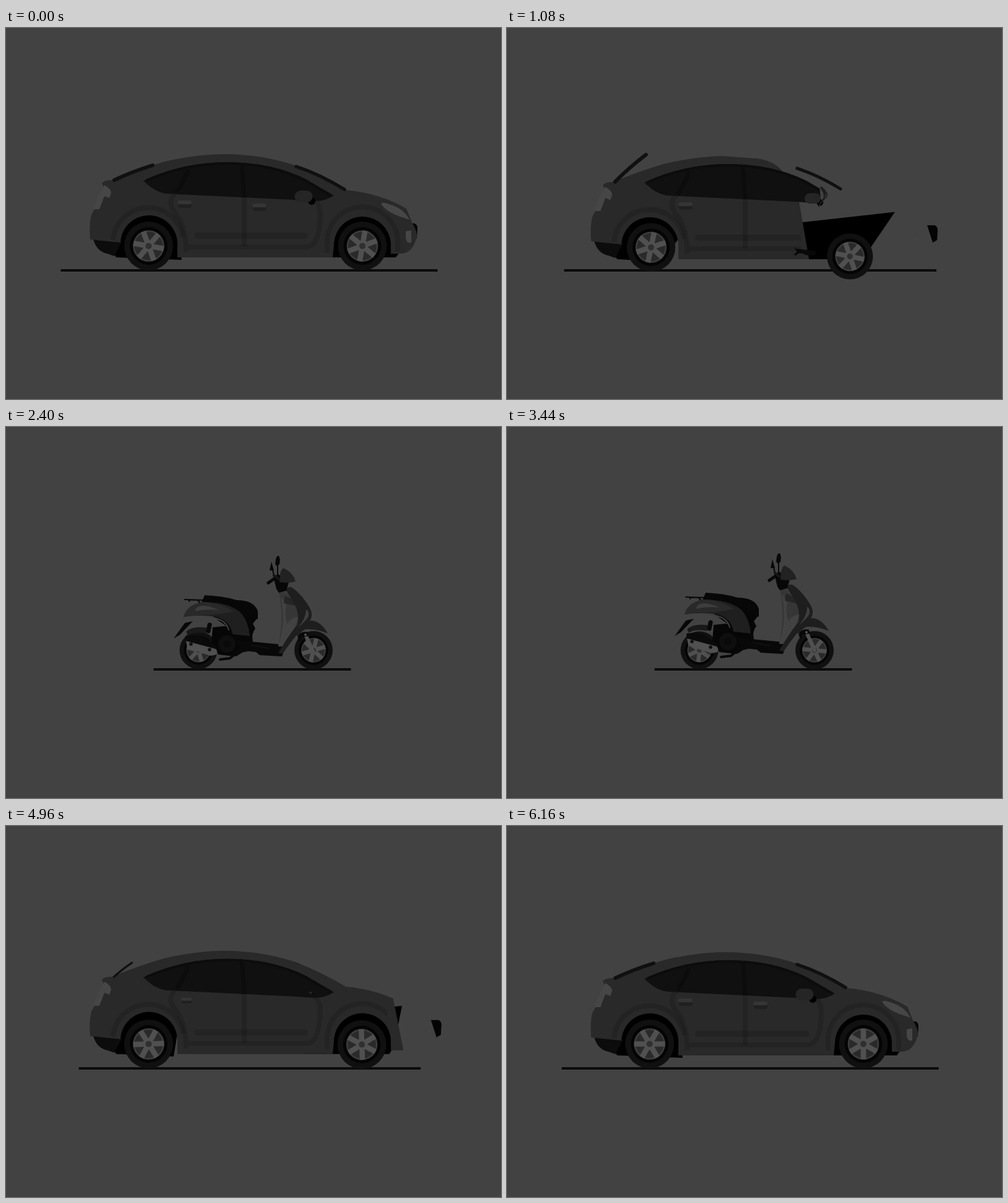
Recreate the animation shown at these times as an HTML page with a canvas. Size 800 px wide and 600 px high, loop 6.2 s.

```html
<!DOCTYPE html>
<html>
<head>
<meta charset="utf-8">
<style>
html, body { margin: 0; width: 100%; height: 100%; overflow: hidden; background: #424242; }
canvas { display: block; }
</style>
</head>
<body>
<canvas id="stage" width="800" height="600"></canvas>
<script>
const LOOP = 6200, TAU = Math.PI * 2;
const ctx = document.getElementById('stage').getContext('2d');
const SHADE = 'rgba(0,0,0,.15)';

const mix = (a, b, k) => a + (b - a) * k;
const ease = u => (1 - Math.cos(Math.PI * u)) / 2;

// Smooth interpolation through [time, value] pairs
function key(t, ...pairs) {
  if (t <= pairs[0][0]) return pairs[0][1];
  for (let i = 1; i < pairs.length; i++) {
    const [t0, a] = pairs[i - 1], [t1, b] = pairs[i];
    if (t <= t1) return mix(a, b, ease((t - t0) / (t1 - t0)));
  }
  return pairs[pairs.length - 1][1];
}
const carOn = (t, a, b, c, d) => key(t, [a, 1], [b, 0], [c, 0], [d, 1]);
const bikeOn = (t, a, b, c, d) => 1 - carOn(t, a, b, c, d);

function fill(d, color) {
  ctx.fillStyle = color;
  ctx.fill(new Path2D(d));
}
function line(d, color, width, cap = 'round') {
  ctx.strokeStyle = color;
  ctx.lineWidth = width;
  ctx.lineCap = cap;
  ctx.lineJoin = 'round';
  ctx.stroke(new Path2D(d));
}
function disc(x, y, r, color) {
  ctx.fillStyle = color;
  ctx.beginPath();
  ctx.arc(x, y, r, 0, TAU);
  ctx.fill();
}
function group(draw, dx = 0, dy = 0) {
  ctx.save();
  ctx.translate(dx, dy);
  draw();
  ctx.restore();
}
// Draws a part scaled and turned about its pivot
function part(k, x, y, draw, turn = 0) {
  if (k < .005) return;
  group(() => {
    ctx.rotate(turn);
    ctx.scale(k, k);
    ctx.translate(-x, -y);
    draw();
  }, x, y);
}
function clipped(d, draw) {
  ctx.save();
  ctx.clip(new Path2D(d));
  draw();
  ctx.restore();
}

function wheel(x, y, r, turn) {
  disc(x, y, r, '#101010');
  part(r / 39, x, y, () => {
    disc(x, y, 30, '#040404');
    disc(x, y, 25, '#3c3c3c');
    disc(x, y, 22.5, '#2a2a2a');
    for (let i = 0; i < 6; i++) {
      const a = i * TAU / 6, c = Math.sin(a), s = -Math.cos(a);
      line(`M${x} ${y}L${x + c * 24.5} ${y + s * 24.5}`, '#505050', 8.5, 'butt');
    }
    disc(x, y, 9, '#505050');
    disc(x, y, 5, '#303030');
  }, turn);
}

function handle(x, y) {
  line(`M${x + 5} ${y + 8}h14`, '#202020', 8);
  line(`M${x + 3} ${y + 3}h17`, '#353535', 6);
}

function car(t) {
  const edge = mix(130, 700, carOn(t, 780, 1500, 4420, 5100));
  const q = (edge - 189) / 293;
  const at = (x0, y0, x1, y1) => `${mix(x0, x1, q)} ${mix(y0, y1, q)}`;
  const front = `M0 ${mix(297, 210, q) - 30}L${at(145, 297, 400, 210)}Q${at(168, 303, 430, 214)} ` +
    `${at(180, 312, 443, 234)}L${at(189, 330, 467, 280)} ${at(186, 350, 482, 368)} ` +
    `${at(187, 420, 484, 400)}L0 420Z`;
  const shown = edge > 132;

  const nose = carOn(t, 800, 1300, 4850, 5180);
  group(() => part(Math.min(1, nose * 5), 660, 330, () =>
    fill('M648 316H660Q665 318 665 324L664 340 657 344Z', '#040404')), 52 * (1 - nose));

  // Black floor pan behind the front and rear wheels
  const base = carOn(t, 1000, 1500, 4360, 4960);
  const foot = carOn(t, 880, 1400, 4460, 5060);
  if (base > .01) fill(`M434 316L${mix(434, 640, base)} ${mix(316, 293, base)}` +
    `L${mix(467, 638, foot)} 360 ${mix(467, 630, foot)} 371H${mix(467, 482, base)}L462 356Z`, '#000');
  const liner = carOn(t, 760, 1500, 4620, 5080);
  part(Math.min(1, liner * 3), 190, 360, () =>
    fill(`M180 345L186 300H277V338L${mix(200, 284, liner)} 375 180 371Z`, '#000'));

  const back = carOn(t, 1300, 1600, 4280, 4520);
  part(back, 150, 345, () => {
    fill('M162 345H180L189 371H178Z', '#000');
    fill('M141 342L187 346L175 369 164 365Q147 362 141 342Z', '#0c0c0c');
  });

  if (shown) clipped(front, () => {
    fill('M136 342Q134 316 138 302L143 293 158 258 155 251Q158 246 171 246Q236 220 270 213' +
      'Q318 204 352 204Q412 204 467 222Q511 239 549 262Q604 267 647 292L656 314' +
      'Q665 329 664 338Q657 365 638 365H622V351A46 46 0 0 0 530 351L528 371H277V351' +
      'A46 46 0 0 0 185 347Z', '#292929');
  });

  const reach = 265 + 205 * q + 60 * Math.max(0, q - 1);
  const glass = mix(258, 502, q);
  if (shown) {
    clipped(`M0 0H${reach}V420H0Z`, () => {
      line('M173 343A57 57 0 0 1 286 338M519 363V348A57 57 0 0 1 633 345V362', SHADE, 8, 'butt');
      line('M274 266Q258 284 276 302Q291 322 291 362M295 354H486Q508 353 508 296Q506 284 498 278', SHADE, 8, 'butt');
      line('M309 336H483', SHADE, 10);
      line('M385 274V350', SHADE, 8);
    });
    clipped(`M0 0H${glass - 8}V238Q${glass - 3} 242 ${glass} 267V420H0Z`, () => {
      fill('M222 247Q286 217 357 217Q429 217 484 244L530 271Q515 281 495 280L467 278 260 268' +
        'Q241 266 222 247Z', '#101010');
      line('M228 246Q290 219 357 219Q428 219 482 246L524 270', '#0c0c0c', 4);
      line('M294 229Q289 246 276 266M381 218L385 274', '#0c0c0c', 7, 'butt');
    });
  }

  const shift = key(t, [4700, 0], [5100, 6], [5480, 3], [5800, 0]);
  part(carOn(t, 1080, 1340, 4760, 5060), 288, 284, () => handle(277 + shift, 279));
  part(carOn(t, 800, 1060, 4900, 5180), 410, 289, () => handle(398 + shift, 284));

  const mirror = carOn(t, 1000, 1400, 4880, 5160);
  group(() => part(mirror, 481, 272, () => {
    disc(494, 280, 6, '#000');
    line('M476 272.5H486', '#252525', 19);
  }), 13 * key(t, [850, 0], [1080, 1], [4900, 1], [5180, 0]));

  part(carOn(t, 760, 1040, 4960, 5240), 630, 295, () =>
    fill('M606 284Q610 281 616 284Q643 291 652 310L634 304Q612 295 606 284Z', '#464646'));
  const fog = carOn(t, 880, 1180, 4980, 5260);
  group(() => part(fog, 651, 338, () =>
    fill('M646 329L655 327V347Q648 349 646 340Z', '#464646')), 14 * (1 - fog));
  part(back, 155, 285, () =>
    fill('M159 254Q170 260 170 267L167 275 159 272 151 293H141Q145 280 150 270Z', '#464646'));

  const fin = carOn(t, 1080, 1420, 4800, 5100);
  const lift = key(t, [780, 0], [1200, -.43], [4800, -.43], [5220, 0]);
  part(fin, 174, 247, () => line('M175 246Q202 233 237 222', '#101010', 6), lift);
  const wiper = carOn(t, 1020, 1320, 4900, 5200);
  part(wiper, 467, 223, () => line('M469 224Q508 237 547 261', '#101010', 5.5));
}

function bikeBack(t) {
  const tail = bikeOn(t, 1650, 2000, 4260, 4500);
  const cowl = bikeOn(t, 1600, 1950, 4280, 4520);
  const seat = bikeOn(t, 1500, 1900, 4280, 4540);
  const engine = bikeOn(t, 1450, 1800, 4580, 4850);

  part(tail, 320, 310, () => {
    fill('M271 338L289 313 302 310 281 332Z', '#080808');
    line('M289 275L320 276M296 276V278M310 276L313 280', '#080808', 2.2);
    fill('M291 327Q302 317 327 321L323 330Q303 326 294 333Z', '#191919');
    line('M329 316L327 326', '#080808', 7);
  });
  part(engine, 375, 345, () => {
    fill('M334 320L354 318 380 325 394 338 385 358 370 367 343 364 332 344Z', '#060606');
    disc(357, 347, 14, '#0e0e0e');
    disc(357, 347, 6, '#0a0a0a');
    line('M346 372L362 370 374 360 389 357', '#080808', 4);
    fill('M342 274L376 287 407 304 399 314 403 322Q396 330 399 344L374 340 362 322 335 303Z', '#060606');
  });
  part(seat, 395, 305, () =>
    fill('M316 280L321 268Q350 269 373 276Q401 276 407 294L407 307Q360 292 316 280Z', '#070707'));
  part(cowl, 385, 310, () => {
    fill('M287 303Q292 284 317 279Q361 279 380 297Q392 311 394 334L366 331Q362 309 340 303Q312 299 287 303Z', '#1f1f1f');
    fill('M287 303Q293 284 317 279Q346 280 367 294Q340 301 310 300Z', '#292929');
    fill('M306 292Q308 285 319 285Q332 286 344 292Q322 290 307 294Z', '#3d3d3d');
    line('M318 304Q354 302 360 324', '#414141', 2);
  });
  part(cowl, 341, 360, () => {
    fill('M290 334Q307 331 320 336L342 353 341 360 291 344Z', '#0a0a0a');
    fill('M291 342L339 355Q343 359 340 364L331 366 293 354Z', '#505050');
    disc(299, 347, 2.8, '#111');
    disc(329, 356, 2.8, '#111');
  });
}

function bikeFront(t, dx) {
  const floor = bikeOn(t, 900, 1300, 4600, 4900);
  const shield = bikeOn(t, 940, 1320, 4600, 4900);
  const panel = bikeOn(t, 1300, 1650, 4300, 4540);
  const fork = bikeOn(t, 1200, 1500, 4480, 4740);
  const bars = bikeOn(t, 1300, 1700, 4250, 4540);

  group(() => part(floor, 446, 360, () => {
    fill('M366 333L374 341 438 347 452 351 446 367 410 365 404 360 386 358 372 367 366 363 378 354Z', '#080808');
    line('M398 349L425 354', '#111', 2);
  }), dx);

  group(() => {
    part(fork, 497, 361, () => {
      line('M484 332L497 361', '#505050', 6);
      fill('M471 334Q478 325 488 328L489 334 478 336 474 344Z', '#080808');
      disc(484, 332, 2, '#555');
      fill('M468 330Q477 310 494 309Q510 311 520 330Q502 322 484 323Q474 328 472 336Z', '#1e1e1e');
    });
    part(panel, 455, 310, () => {
      fill('M441 263L452 263Q464 276 476 300Q472 330 447 351H440Q450 305 441 263Z', '#363636');
      fill('M444 270Q453 310 440 350L448 351 464 328 473 303Q458 305 455 315Q449 299 453 284Z', '#424242');
      fill('M451 269L469 278 471 286 449 281Z', '#252525');
    });
    part(shield, 455, 250, () => {
      fill('M453 261Q454 252 463 256Q479 268 490 287Q499 302 488 313Q470 329 447 363L440 361' +
        'Q462 325 471 316Q475 294 463 277Z', '#1e1e1e');
      fill('M485 291Q490 293 489 302Q484 311 472 320Q485 306 485 291Z', '#3e3e3e');
    });
    part(bars, 450, 255, () => {
      line('M439 241V220M434 241L431 227', '#080808', 2);
      fill('M435 218Q436 204 440 204Q444 206 442 218L438 221Z', '#080808');
      fill('M429 214L433 228H426Z', '#080808');
      line('M424 248L434 241', '#080808', 5);
      fill('M432 238L440 234 457 247 453 261 441 264 437 258Z', '#070707');
      fill('M443 236Q443 229 448 224Q464 231 468 246L456 248 442 247Z', '#222');
      line('M433 236L441 242', '#151515', 4);
    });
  }, dx);
}

function draw(t) {
  ctx.fillStyle = '#424242';
  ctx.fillRect(0, 0, 800, 600);

  const road = carOn(t, 1000, 1800, 4500, 5150);
  const mid = mix(398, 393, road), half = mix(159.5, 304.5, road);
  line(`M${mid - half} 392H${mid + half}`, '#0b0b0b', 4, 'butt');

  const carY = key(t, [200, 0], [600, .5], [1080, 3], [1400, 6], [4300, 4], [4560, 3],
    [5150, -4], [5480, -1.5], [5780, 0]);
  const bikeY = key(t, [1100, 5], [2100, 5], [2400, 4], [3150, 0], [3480, 0], [3840, 5]);
  const rear = carOn(t, 940, 2240, 4360, 4900);
  const front = carOn(t, 870, 1470, 4420, 5000);
  const dip = k => 16.5 * Math.sin(Math.PI * k ** 1.3);
  const spin = t / LOOP * 26 * TAU / 6 + .17;
  const frontX = mix(497, 576, front);

  group(() => car(t), 0, carY);
  wheel(mix(311, 230.5, rear), mix(361, 352.5, rear) + dip(rear), mix(30.5, 39.5, rear), spin + TAU / 12);
  wheel(frontX, mix(361, 352.5, front) + dip(front), mix(31, 39.5, front), spin);
  group(() => bikeBack(t), 0, bikeY);
  group(() => bikeFront(t, (frontX - 497) * .9), 0, bikeY);
}

const start = performance.now();
function tick() {
  draw((performance.now() - start) % LOOP);
  requestAnimationFrame(tick);
}
tick();
</script>
</body>
</html>
```
